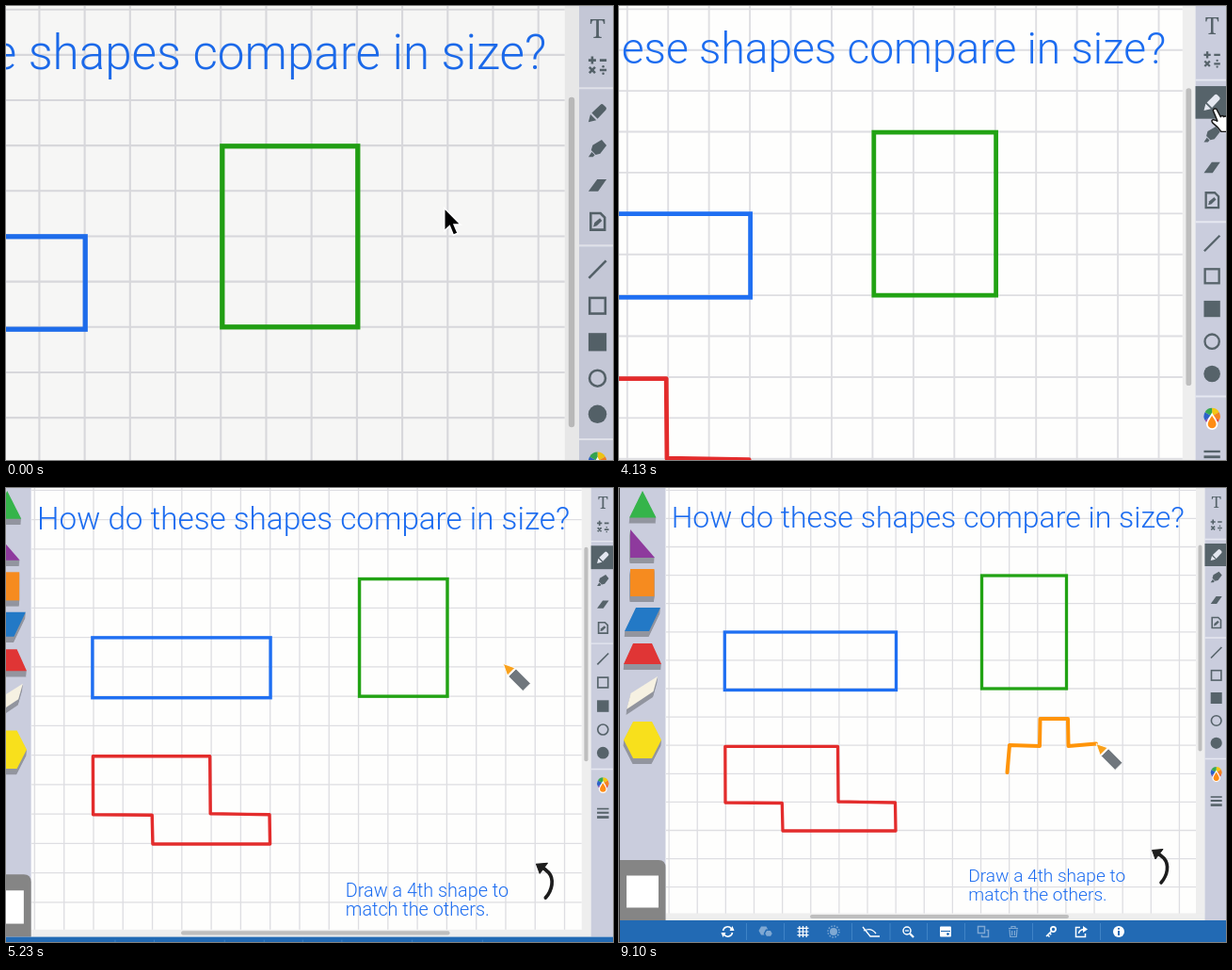
Recreate the animation shown at these times as an HTML page. Size 645x482 px, loop 9800 ms.

```html
<!DOCTYPE html>
<html lang="en">
<head>
<meta charset="utf-8">
<title>Comparing shapes</title>
<style>
  html, body { margin: 0; width: 100%; height: 100%; overflow: hidden; background: #fff; }
  svg { display: block; width: 100vw; height: 100vh; }
  text { font-family: Roboto, sans-serif; font-weight: 300; fill: #1c6cf0; }
  .outline { fill: none; stroke-width: 3.3; }
  .tool { fill: #56636a; }
  .line { fill: none; stroke: #56636a; stroke-width: 1.6; }
  .bar { fill: none; stroke: #fff; stroke-width: 1.5; }
  .bar .solid { fill: #fff; stroke: none; }
  .dim { opacity: .42; }
</style>
</head>
<body>
<svg viewBox="0 0 645 482" preserveAspectRatio="none">
  <defs>
    <radialGradient id="spot" gradientUnits="userSpaceOnUse" cx="638" cy="115" r="76">
      <stop offset=".76" stop-opacity="0"/>
      <stop offset=".87" stop-opacity=".3"/>
      <stop offset="1" stop-opacity=".7"/>
    </radialGradient>
  </defs>

  <g id="camera">
    <rect width="645" height="482" fill="#fefefd"/>
    <path id="grid" fill="none" stroke="#dedee2" stroke-width="1.3"/>

    <text x="55.7" y="42" font-size="32">How do these shapes compare in size?</text>
    <text x="371.3" y="418" font-size="19.1">Draw a 4th shape to</text>
    <text x="371.3" y="437.5" font-size="19.1">match the others.</text>

    <path d="M576 419C583 411 585 400 579 393Q575 389 570 387" fill="none" stroke="#1d1d1d" stroke-width="3.6" stroke-linecap="round"/>
    <path d="M566.5 384.5L578 383.5L570 394Z" fill="#1d1d1d" stroke="#1d1d1d" stroke-linejoin="round"/>

    <rect class="outline" x="112.3" y="153" width="182.2" height="61.5" stroke="#1f6ff2"/>
    <rect class="outline" x="385.5" y="93" width="90" height="120" stroke="#22a314"/>
    <path class="outline" d="M112.8 274.3H232.5L233 333L293.5 334L294 364H174L173.3 334.5L113 334Z" stroke="#e32c2c" stroke-linejoin="round"/>
    <polyline id="ink" fill="none" stroke="#ff9408" stroke-width="4" stroke-linecap="round" stroke-linejoin="round"/>

    <rect x="613" width="9.5" height="459" fill="#eeeeee"/>
    <rect x="50" y="451.5" width="572.5" height="8" fill="#eeeeee"/>
    <rect x="615.5" y="60.5" width="4" height="219" rx="2" fill="#bebebe"/>
    <rect x="203" y="453" width="275" height="4" rx="2" fill="#bebebe"/>

    <rect width="49.5" height="459" fill="#cacddd"/>
    <g id="blocks"></g>
    <path d="M0 395H42Q49.5 395 49.5 403V459H0Z" fill="#858585"/>
    <rect x="8" y="411.5" width="34" height="34" fill="#fff"/>

    <rect x="622.5" width="22.5" height="459" fill="#cacddd"/>
    <path d="M622.5 54.5H645M622.5 159H645M622.5 287.5H645" stroke="#e6e8f1" stroke-width="1.3"/>
    <rect id="selected" x="622.5" y="59" width="22.5" height="24" fill="#56636a"/>
    <g id="tools" transform="translate(634.7 0)">
      <text y="21" text-anchor="middle" font-size="17" style="font-family:'Noto Serif',serif;font-weight:400;fill:#56636a">T</text>
      <path class="line" d="M-6 36H-1M-3.5 33.5V38.5M1.5 36H6M-5.4 40.6L-1.6 44.4M-5.4 44.4L-1.6 40.6M1.5 42.5H6" stroke-width="1.3"/>
      <g class="tool"><circle cx="3.8" cy="40.2" r=".8"/><circle cx="3.8" cy="44.8" r=".8"/></g>
      <path id="pencilTool" d="M-6 6L-4.7 .9L-.8 4.8ZM-3.8 0L2 -5.6Q3 -6.5 4 -5.4L5.5 -3.9Q6.4 -3 5.5 -2L0 3.9Z" transform="translate(0 71)"/>
      <path class="tool" d="M-6 5.5L-3.8 2.2L-1.8 4.2L-3 5.5ZM-4.2 1L-3.2 -2.4L2.8 -6L6 -2.2L1.8 3.2L-1.2 4Z" transform="translate(0 94.7)"/>
      <path class="tool" d="M-6 123L-.2 115H6L.4 123Z"/>
      <path class="line" d="M-4.5 137.5H2L4.8 140.3V148.5H-4.5Z" stroke-width="1.3"/>
      <path class="tool" d="M-2.8 146.5L-2 143.8L1.6 140.8L3 142.5L-.4 145.8Z"/>
      <path class="line" d="M-5.7 180.5L5.7 169"/>
      <rect class="line" x="-5.2" y="193.7" width="10.4" height="10.4"/>
      <rect class="tool" x="-6" y="217" width="12" height="12"/>
      <circle class="line" cy="247" r="5.3"/>
      <circle class="tool" cy="270.8" r="6.1"/>
      <g id="wheel"></g>
      <path d="M0 300.5C2 304 3.7 305.5 3.7 307.8A3.7 3.7 0 0 1 -3.7 307.8C-3.7 305.5 -2 304 0 300.5Z" fill="#ff8c14" stroke="#fff" stroke-width="1.2"/>
      <path class="line" d="M-6 328H6" stroke-width="1"/>
      <path class="line" d="M-6 332H6" style="stroke-width:2"/>
      <path class="line" d="M-6 336.6H6" style="stroke-width:2.6"/>
    </g>

    <rect y="459" width="645" height="23" fill="#226ab4"/>
    <path d="M135.5 462V480M175.5 462V480M247.5 462V480M288 462V480M327.5 462V480M367.5 462V480M439.5 462V480M511.5 462V480" stroke="#3f83c6"/>
    <g class="bar" transform="translate(0 471)">
      <g transform="translate(115.5 0)"><path d="M-5 -1A5 5 0 0 1 4 -3M5 1A5 5 0 0 1 -4 3"/><path class="solid" d="M2 -1H7L5 -6ZM-2 1H-7L-5 6Z"/></g>
      <g class="dim" transform="translate(155.5 0)"><path class="solid" d="M-7 -1L-4.5 -5.5H1L3.5 -1L1 3.5H-4.5Z"/><path class="solid" d="M-1 2L1 -1.7H6L8 2L6 5.5H1Z" style="stroke:#226ab4"/></g>
      <path d="M189.5 -3.7H201.5M189.5 0H201.5M189.5 3.7H201.5M191.8 -6V6M195.5 -6V6M199.2 -6V6" stroke-width="1.2"/>
      <g class="dim" transform="translate(228 0)"><circle class="solid" r="4"/><circle r="6" stroke-dasharray="1.5 1.6"/></g>
      <path d="M259 -5L267 5H277M260 -1Q268 -5 273 2" stroke-width="1.3"/>
      <g transform="translate(307 0)"><circle cx="-1" cy="-1" r="4"/><path d="M2 2L6 6" stroke-width="2.3"/><path d="M-3 -1H1" stroke-width="1.2"/></g>
      <g transform="translate(347 0)"><rect class="solid" x="-6" y="-5.5" width="12" height="11" rx="1"/><path d="M-5 -.5H5M1 2.5H4M2.5 1V4" stroke="#226ab4" stroke-width="1.2"/></g>
      <g class="dim" transform="translate(387 0)"><rect x="-5.5" y="-5.5" width="7" height="7"/><path d="M3.5 -1.5H5.5V5.5H-1.5V3.5"/></g>
      <path class="dim" d="M414 -3.5H424M417 -4V-5.5H421V-4M415 -2.5L415.7 5.5H422.3L423 -2.5M417.6 -1V4M420.4 -1V4" stroke-width="1.2"/>
      <g transform="translate(459 0)"><circle cx="2.5" cy="-2.5" r="2.6" stroke-width="1.8"/><path d="M.5 -.5L-5 5M-3.5 3.5L-1.5 5.5M-1.5 1.5L.3 3.3"/></g>
      <g transform="translate(491 0)"><path d="M-1 -4.5H-5.5V5.5H4.5V2M-2.5 2Q-2 -2 3 -2.5"/><path class="solid" d="M2 -6L7 -2.5L2 1Z"/></g>
      <circle class="solid" cx="531" r="6"/>
      <path d="M531 -1V4M531 -4V-2.3" stroke="#226ab4" stroke-width="2"/>
    </g>
    <rect width="1" height="482" fill="#333"/>
  </g>

  <rect id="shade" width="645" height="482" opacity=".032"/>
  <rect id="spotlight" width="645" height="482" fill="url(#spot)"/>

  <g id="pointer">
    <path id="arrow" d="M0 0V15.3L3.5 12L6 18L8.9 16.7L6.4 11H10.8Z" fill="#000" stroke="#fff" stroke-width=".9"/>
    <path id="hand" d="M-1.5 1.5Q-1 -.6 1 .4L4 6Q5.3 4.6 6.3 6Q8 5 8.7 6.6Q10.5 6 11 8L12 12L10.5 17H4.5Q2.5 14 -1.8 10.6Q-3.2 8.6 -1.6 8.2Q0 8 1.8 9.5Z" fill="#fff" stroke="#151515" stroke-width="1"/>
    <g id="pencil" transform="rotate(45)" stroke="#fff" stroke-width=".8">
      <path d="M0 0L11.5 -5.5V5.5Z" fill="#f9a11b"/>
      <path d="M13 -5.5H34V5.5H13Z" fill="#70777d"/>
    </g>
  </g>
</svg>

<script>
const LOOP = 9800;
const $ = id => document.getElementById(id);
const easeInOut = u => u < .5 ? 2 * u * u : 1 - 2 * (1 - u) ** 2;
const progress = (t, from, to) => easeInOut(Math.min(1, Math.max(0, (t - from) / (to - from))));

function add(parent, tag, attrs) {
  const el = document.createElementNS('http://www.w3.org/2000/svg', tag);
  for (const key in attrs) el.setAttribute(key, attrs[key]);
  parent.append(el);
}

function buildGrid() {
  let d = '';
  for (let k = 0; k < 19; k++) d += `M${53.1 + 30.13 * k} 0V452`;
  for (let k = 0; k < 15; k++) d += `M50 ${2.3 + 30.1 * k}H613`;
  $('grid').setAttribute('d', d);
}

function buildBlocks() {
  const blocks = [
    ['#35b44a', '25,3 39.5,31.5 11,31.5'],
    ['#8e3a9d', '12,44 38,74 12,74'],
    ['#f68b1f', '12,86 37.5,86 37.5,115 12,115'],
    ['#2379c6', '18,127 44,127 32,152 6,152'],
    ['#e03535', '15,165 35,165 45,187 5,187'],
    ['#f6f1e2', '41,200 36.5,216 8,235 12.5,218'],
    ['#f8e01c', '15,248 35,248 45,267.5 35,287 15,287 5,267.5']
  ];
  for (const [fill, points] of blocks) {
    for (let depth = 6; depth > 0; depth--)
      add($('blocks'), 'polygon', { points, fill: '#92959f', transform: `translate(${-depth / 12} ${depth})` });
    add($('blocks'), 'polygon', { points, fill });
  }
}

function buildWheel() {
  const colors = ['#f4c814', '#f58220', '#e23636', '#8b3fa8', '#2b62c9', '#36a852'];
  const rim = a => `${6 * Math.sin(a)} ${302 - 6 * Math.cos(a)}`;
  colors.forEach((fill, i) => {
    const a = i * Math.PI / 3;
    add($('wheel'), 'path', { fill, d: `M0 302L${rim(a)}A6 6 0 0 1 ${rim(a + Math.PI / 3)}Z` });
  });
}

// Pointer stops: time, x, y
const path = [
  [0, 533, 134], [1100, 533, 134], [1600, 637, 75.5], [4820, 637, 75.5],
  [5660, 419, 293], [5960, 419, 293], [6460, 412.5, 302], [6630, 412.5, 302],
  [7060, 415, 273], [7600, 447, 274], [7630, 447, 274], [7930, 447.5, 245],
  [8270, 477, 245], [8600, 477.5, 274], [8630, 477.5, 274], [9100, 507, 271.5],
  [LOOP, 507, 271.5]
];
const INK_START = 6630;

function pointerAt(t) {
  const i = path.findIndex(stop => stop[0] > t);
  const [t0, x0, y0] = path[i - 1], [t1, x1, y1] = path[i];
  const p = progress(t, t0, t1);
  return [x0 + (x1 - x0) * p, y0 + (y1 - y0) * p];
}

const show = (id, on) => $(id).style.display = on ? '' : 'none';

function render(t) {
  const scale = 1.6 - .6 * progress(t, 3260, 5660);
  const camera = `translate(${645 * (1 - scale)} 0) scale(${scale})`;
  const [x, y] = pointerAt(t);
  $('camera').setAttribute('transform', camera);
  $('pointer').setAttribute('transform', `${camera} translate(${x} ${y})`);

  show('arrow', t < 1570);
  show('hand', t >= 1570 && t < 4790);
  show('pencil', t >= 4790);
  show('shade', t < 60);
  show('spotlight', t >= 2060 && t < 3260);
  show('selected', t >= 3260);
  $('pencilTool').setAttribute('fill', t >= 3260 ? '#e4e7f0' : '#56636a');

  const drawn = path.filter(([time]) => time >= INK_START && time <= t).map(([, px, py]) => [px, py]);
  if (t > INK_START) drawn.push([x, y]);
  $('ink').setAttribute('points', drawn.join(' '));
}

function tick() {
  render(performance.now() % LOOP);
  requestAnimationFrame(tick);
}

buildGrid();
buildBlocks();
buildWheel();
tick();
</script>
</body>
</html>
```
